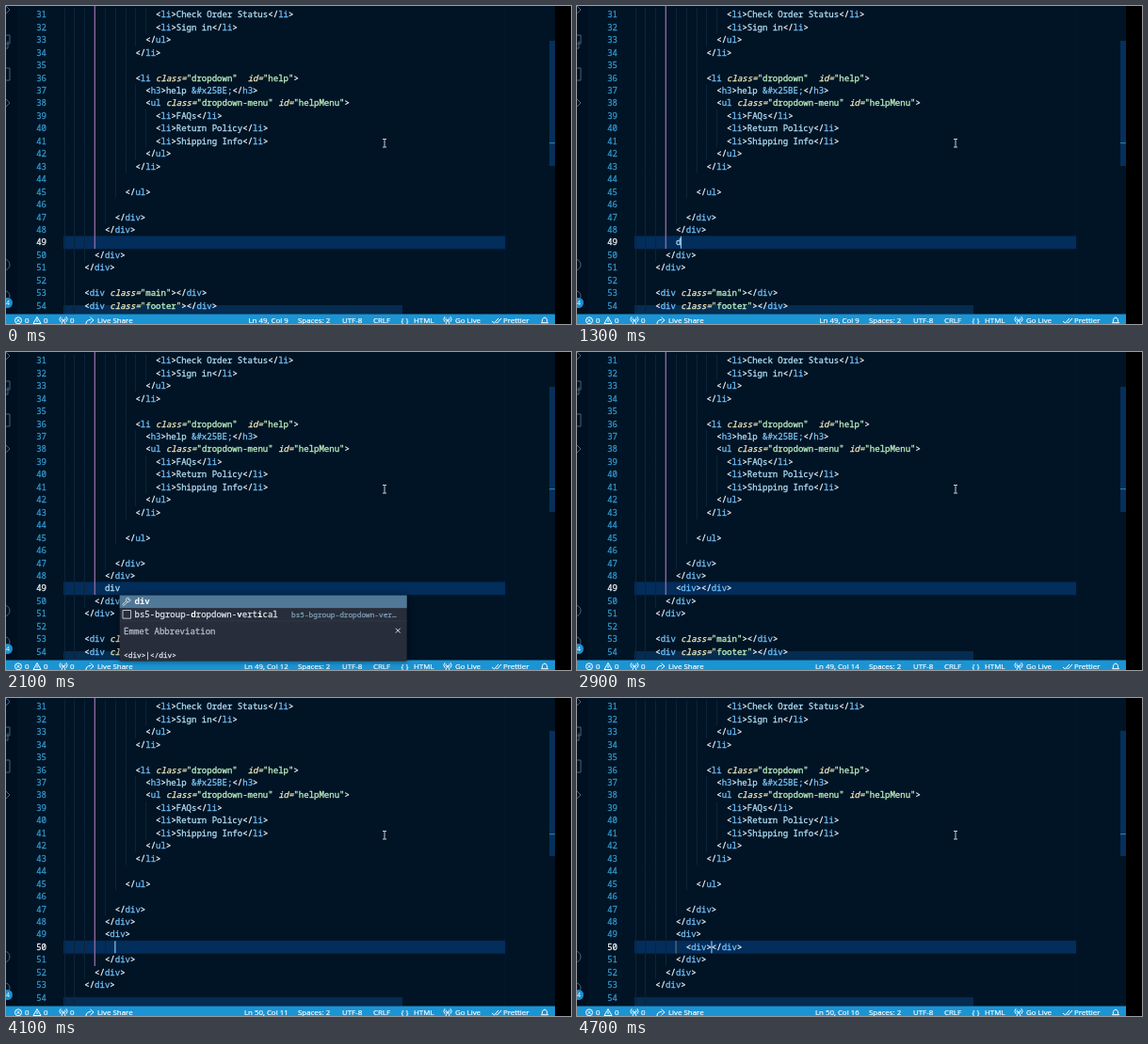
Animation of 600 by 338 pixels, one loop 5000 ms. Source, as an HTML page with a canvas:

```html
<!DOCTYPE html>
<html lang="en">
<head>
<meta charset="utf-8">
<title>Typing in a code editor</title>
<style>
html, body { margin: 0; width: 100%; height: 100%; overflow: hidden; background: #000; }
canvas { display: block; width: 600px; height: 338px; }
</style>
</head>
<body>
<canvas id="stage" width="600" height="338"></canvas>
<script>
const ctx = document.getElementById('stage').getContext('2d');
const MONO = '"Noto Sans Mono", "DejaVu Sans Mono", monospace';
const SANS = '"Open Sans", "Noto Sans", sans-serif';
const CODE_SIZE = 9.03, SMALL_SIZE = 7.75;
const CHAR = 5.418, LINE = 13.46, LEFT = 61.6, FIRST = 31;
const STATUS_TOP = 327.5, LOOP = 5000;

const colors = {
  bg: '#011425', activity: '#011020', guide: '#0b2439', pair: '#a77bb8',
  row: '#032d5b', bracket: '#f4f9fd', tag: '#72c1fb', attr: '#f7eec0',
  string: '#c0f2c4', text: '#b2e0f8', entity: '#7cc6f5', number: '#3396cb',
  status: '#1b94d4', popup: '#272d3a', selected: '#517896', hover: '#061626', hint: '#7c9cb6'
};

// Each entry: indent in columns, then the code.
const head = [
  [18, '<li>Check Order Status</li>'], [18, '<li>Sign in</li>'],
  [16, '</ul>'], [14, '</li>'], [14, ''],
  [14, '<li class="dropdown"  id="help">'],
  [16, '<h3>help &#x25BE;</h3>'],
  [16, '<ul class="dropdown-menu" id="helpMenu">'],
  [18, '<li>FAQs</li>'], [18, '<li>Return Policy</li>'], [18, '<li>Shipping Info</li>'],
  [16, '</ul>'], [14, '</li>'], [12, ''], [12, '</ul>'], [10, ''],
  [10, '</div>'], [8, '</div>']
];
const tail = [
  [6, '</div>'], [4, '</div>'], [4, ''],
  [4, '<div class="main"></div>'], [4, '<div class="footer"></div>']
];

// Asterisks switch bold on and off; the last value insets the hint.
const longList = [
  ['*dir*'], ['*div*'],
  ['bs5-alert-*di*smissible', 'bs5-alert-dismissible'],
  ['bs5-button-*di*sabled-a', 'bs5-button-disabled-a'],
  ['bs5-popover-*di*rection', 'bs5-popover-direction'],
  ['bs5-popover-*di*smissible', 'bs5-popover-dismissible'],
  ['bs5-typography-*di*splay-headi…', 'bs5-typography-display…', 2],
  ['bs5-*d*ropdown-s*i*zed', 'bs5-dropdown-sized'],
  ['bs5-*d*ropdown-al*i*gnment', 'bs5-dropdown-alignment'],
  ['bs5-*d*ropdown-spl*i*t', 'bs5-dropdown-split'],
  ['bs5-*d*ropdown-up-spl*i*t', 'bs5-dropdown-up-split'],
  ['bs5-typography-*d*escr*i*ption-li…', 'bs5-typography-descri…', 4]
];
const shortList = [
  ['*div*'],
  ['bs5-bgroup-*d*ropdown-*v*ert*i*cal', 'bs5-bgroup-dropdown-ver…', 4]
];

const colX = col => LEFT + col * CHAR;
const rowY = line => 9 + (line - FIRST) * LINE;

function rect(x, y, w, h, color) {
  ctx.fillStyle = color;
  ctx.fillRect(x, y, w, h);
}

function label(str, x, y, color, font, align = 'left') {
  ctx.font = font;
  ctx.textAlign = align;
  ctx.fillStyle = color;
  ctx.fillText(str, x, y);
}

// Code text is a little heavier than the regular weight.
function mono(str, x, y, color, { style = '', size = CODE_SIZE, align = 'left' } = {}) {
  label(str, x, y, color, `${style} ${size}px ${MONO}`, align);
  ctx.strokeStyle = color;
  ctx.lineWidth = 0.28;
  ctx.strokeText(str, x, y);
}

function stroke(color, width, path) {
  ctx.strokeStyle = color;
  ctx.lineWidth = width;
  ctx.beginPath();
  path();
  ctx.stroke();
}

function poly(...points) {
  points.forEach(([x, y], i) => i ? ctx.lineTo(x, y) : ctx.moveTo(x, y));
}

function circle(x, y, r) {
  ctx.moveTo(x + r, y);
  ctx.arc(x, y, r, 0, Math.PI * 2);
}

function codeLine(str, x, y) {
  const parts = str.match(/<\/?|>|"[^"]*"|&[^;]+;|[^<>"&]+/g) || [];
  let inTag = false, named = false;
  const put = (part, color, style) => {
    mono(part, x, y, color, { style });
    x += part.length * CHAR;
  };
  for (const part of parts) {
    if (part[0] === '<') { inTag = true; named = false; put(part, colors.bracket); }
    else if (part === '>') { inTag = false; put(part, colors.bracket); }
    else if (part[0] === '"') put(part, colors.string);
    else if (part[0] === '&') put(part, colors.entity);
    else if (!inTag) put(part, colors.text);
    else if (named) put(part, colors.attr, 'italic');
    else {
      named = true;
      const [tag, attr = ''] = part.split(/(?=\s)/);
      put(tag, colors.tag);
      put(attr, colors.attr, 'italic');
    }
  }
}

// Everything that depends on time.
function stateAt(t) {
  const s = { line: 49, col: 9, typed: '', caret: false, popup: null, split: t >= 3100 };
  if (!s.split) {
    if (t < 1300) s.caret = (t >= 200 && t < 700) || t >= 1200;
    else if (t < 1400) { s.typed = 'd'; s.caret = true; }
    else if (t < 2100) { s.typed = 'di'; s.col = 11; s.popup = { list: longList, hover: 4 }; }
    else if (t < 2400) {
      s.typed = 'div'; s.col = 12; s.caret = t >= 2200;
      s.popup = { list: shortList };
    } else { s.typed = '<div></div>'; s.col = 14; s.caret = t < 2900; }
  } else {
    s.line = 50; s.col = 11;
    if (t < 4200) s.caret = t < 3600 || t >= 4100;
    else if (t < 4300) { s.typed = 'd'; s.caret = true; }
    else if (t < 4500) { s.typed = 'di'; s.col = 13; s.popup = { list: longList, hover: 3 }; }
    else if (t < 4700) { s.typed = 'div'; s.col = 14; s.caret = true; s.popup = { list: shortList }; }
    else { s.typed = '<div></div>'; s.col = 16; s.caret = true; }
  }
  return s;
}

function drawActivityBar() {
  rect(0, 0, 12, STATUS_TOP, colors.activity);
  stroke('#416480', 1, () => {
    poly([0, 0], [4, 4], [0, 8]);
    poly([0, 31], [4, 31], [4, 40], [0, 40]);
    poly([0, 45], [2, 45], [2, 37]);
    poly([0, 66], [4, 66], [4, 79], [0, 79]);
    poly([0, 99], [4, 103], [0, 107]);
    circle(-2, 275, 6);
    circle(-1, 308, 5);
  });
  ctx.fillStyle = '#1c8fce';
  ctx.beginPath();
  circle(1.5, 315.5, 5.5);
  ctx.fill();
  label('4', 2, 318.3, '#fff', `7px ${SANS}`, 'center');
}

function drawEditor(s) {
  const middle = s.split
    ? [[8, '<div>'], [10, s.typed], [8, '</div>']]
    : [[8, s.typed]];
  const lines = [...head, ...middle, ...tail].slice(0, 24);
  if (s.split) lines[23] = [4, ''];
  const activeTop = rowY(s.line) - LINE / 2;

  rect(529.5, 0, 1, STATUS_TOP, '#031a2e');
  rect(61, activeTop - 0.2, 469, LINE + 0.4, colors.row);
  rect(61, 318, 360, STATUS_TOP - 318, '#052c51');
  lines.forEach(([indent, code], i) => {
    const line = FIRST + i, y = rowY(line);
    for (let c = 0; c < indent; c += 2)
      rect(Math.round(colX(c)), y - LINE / 2, 1, LINE + 0.3, colors.guide);
    mono(line, 43, y + 3.2, line === s.line ? '#f0f6fa' : colors.number, { align: 'right' });
    codeLine(code, colX(indent), y + 3.2);
  });

  // Typing inside the new block moves the active guide to it.
  if (s.split && s.typed) rect(104.6, activeTop, 1, LINE, '#6d8199');
  else rect(93.7, 0, 1.1, rowY(s.split ? 52 : 50) - LINE / 2, colors.pair);
  if (s.caret) {
    const lag = s.typed === 'd' ? 1 : 0;
    rect(colX(s.col - 1 + lag) - 0.5, activeTop + 0.3, 1.2, LINE - 0.6, '#82c8f4');
  }

  const thumb = s.split ? 35 : 37;
  rect(577, thumb, 6, 133, '#06305a');
  rect(577, s.split ? 144 : 145, 6, 1.2, '#2b76a8');
}

function drawAntenna(x, y) {
  stroke('#fff', 0.9, () => {
    poly([x - 2, y + 4], [x, y - 1], [x + 2, y + 4]);
    for (const r of [2, 4]) {
      ctx.moveTo(x + r * 0.7, y - 1 - r * 0.7);
      ctx.arc(x, y - 1, r, -0.8, 0.8);
      ctx.moveTo(x - r * 0.7, y - 1 + r * 0.7);
      ctx.arc(x, y - 1, r, Math.PI - 0.8, Math.PI + 0.8);
    }
  });
}

function drawStatus(s) {
  rect(0, STATUS_TOP, 583, 338 - STATUS_TOP, colors.status);
  const font = `7.9px ${SANS}`, y = 337.2;
  const put = (str, x, align) => {
    label(str, x, y, '#fff', font, align);
    ctx.strokeStyle = '#fff';
    ctx.lineWidth = 0.2;
    ctx.strokeText(str, x, y);
  };
  put('0', 20); put('0', 40); put('0', 68);
  put('Live Share', 97);
  put(`Ln ${s.line}, Col ${s.col}`, 299.7, 'right');
  put('Spaces: 2', 310); put('UTF-8', 357); put('CRLF', 390);
  put('{ }', 419.5); put('HTML', 433); put('Go Live', 477); put('Prettier', 528);
  stroke('#fff', 1, () => {
    circle(13, 334.3, 3.5);
    poly([11.5, 332.8], [14.5, 335.8]);
    poly([14.5, 332.8], [11.5, 335.8]);
    poly([29, 337.5], [33, 330.5], [37, 337.5], [29, 337.5]);
    poly([33, 333], [33, 336]);
    poly([516, 335], [518.5, 337], [523, 332]);
    poly([520.5, 336], [521.5, 337], [526, 332]);
    ctx.moveTo(85, 338);
    ctx.quadraticCurveTo(85, 333.5, 90, 333.5);
    poly([89.5, 331], [93, 334], [89.5, 337]);
    poly([568.5, 336.7], [569.5, 335.3], [569.5, 333.3], [571, 331.3], [573, 331.3],
      [574.5, 333.3], [574.5, 335.3], [575.5, 336.7], [568.5, 336.7]);
  });
  drawAntenna(61, 334);
  drawAntenna(469, 334);
}

function drawWrench(x, y) {
  stroke('#d6dee8', 0.9, () => {
    poly([x + 0.2, y - 1], [x - 4, y + 3], [x - 2.8, y + 4.2], [x + 1.4, y + 0.4]);
    ctx.moveTo(x + 4.2, y - 2.4);
    ctx.arc(x + 2, y - 1.9, 2.3, -0.2, Math.PI * 1.6);
    poly([x + 2.7, y - 4], [x + 1.9, y - 2], [x + 4.2, y - 2.4]);
  });
}

function boldRuns(str, x, y) {
  str.split('*').forEach((run, i) => {
    if (i % 2) label(run, x, y, '#fff', `bold ${CODE_SIZE}px ${MONO}`);
    else mono(run, x, y, '#d9e0e9');
    x += run.length * 5.44;
  });
}

function drawPopup(s) {
  const { list, hover } = s.popup;
  const big = list === longList;
  const w = 305, rowH = 13.5, listH = list.length * rowH, docH = big ? 45 : 43;
  const x = colX(s.col - 1) - 0.5;
  const lineTop = rowY(s.line) - LINE / 2;
  const y = big ? lineTop - 164 : lineTop + LINE + 0.6;

  ctx.save();
  ctx.shadowColor = 'rgba(0, 0, 0, 0.5)';
  ctx.shadowBlur = 6;
  rect(x, y, w, listH + docH, colors.popup);
  ctx.restore();

  rect(x, y, w, rowH, colors.selected);
  if (hover) rect(x, y + hover * rowH, w, rowH, colors.hover);
  list.forEach(([name, hint, inset = 0], i) => {
    const mid = y + (i + 0.5) * rowH;
    if (hint) {
      stroke('#b9c2cf', 1, () => ctx.rect(x + 3.3, mid - 4.3, 8.6, 8.6));
      const right = x + 297.9 - inset;
      mono(hint, right, mid + 2.8, i === hover ? '#235f93' : colors.hint, { size: SMALL_SIZE, align: 'right' });
    } else drawWrench(x + 7, mid);
    boldRuns(name, x + 15.8, mid + 3.1);
  });
  if (big) rect(x + w - 6.5, y, 6.5, 152, 'rgba(24, 88, 145, 0.55)');

  const docY = y + listH;
  rect(x, docY, w, 0.6, '#333c4c');
  mono('Emmet Abbreviation', x + 4.4, docY + 14, '#b3bdca');
  const tag = big ? 'dir' : 'div';
  mono(`<${tag}>|</${tag}>`, x + 4.4, docY + 39, '#e0e7ee', { size: SMALL_SIZE });
  const cx = x + 295.6, cy = docY + 10.5;
  stroke('#dbe3ec', 1, () => {
    poly([cx - 2.4, cy - 2.4], [cx + 2.4, cy + 2.4]);
    poly([cx + 2.4, cy - 2.4], [cx - 2.4, cy + 2.4]);
  });
}

function drawPointer(hand) {
  if (!hand) {
    stroke('#c3ccd4', 1, () => {
      poly([400, 141.5], [404, 141.5]);
      poly([402, 141.5], [402, 150]);
      poly([400, 150], [404, 150]);
    });
    return;
  }
  ctx.beginPath();
  poly([400.3, 144], [401.7, 144], [401.8, 148], [405.2, 149], [405.2, 152],
    [404, 155], [400.5, 155], [398, 151], [398.8, 150.2], [400.3, 151.5]);
  ctx.closePath();
  ctx.fillStyle = '#fff';
  ctx.fill();
  ctx.strokeStyle = '#111';
  ctx.lineWidth = 0.4;
  ctx.stroke();
}

function draw(t) {
  const s = stateAt(t);
  rect(0, 0, 600, 338, '#000');
  rect(0, 0, 583, 338, colors.bg);
  ctx.lineJoin = 'round';
  drawEditor(s);
  drawActivityBar();
  drawStatus(s);
  if (s.popup) drawPopup(s);
  drawPointer(s.popup && s.popup.hover);
}

function frame() {
  draw(performance.now() % LOOP);
  requestAnimationFrame(frame);
}
frame();
</script>
</body>
</html>
```
